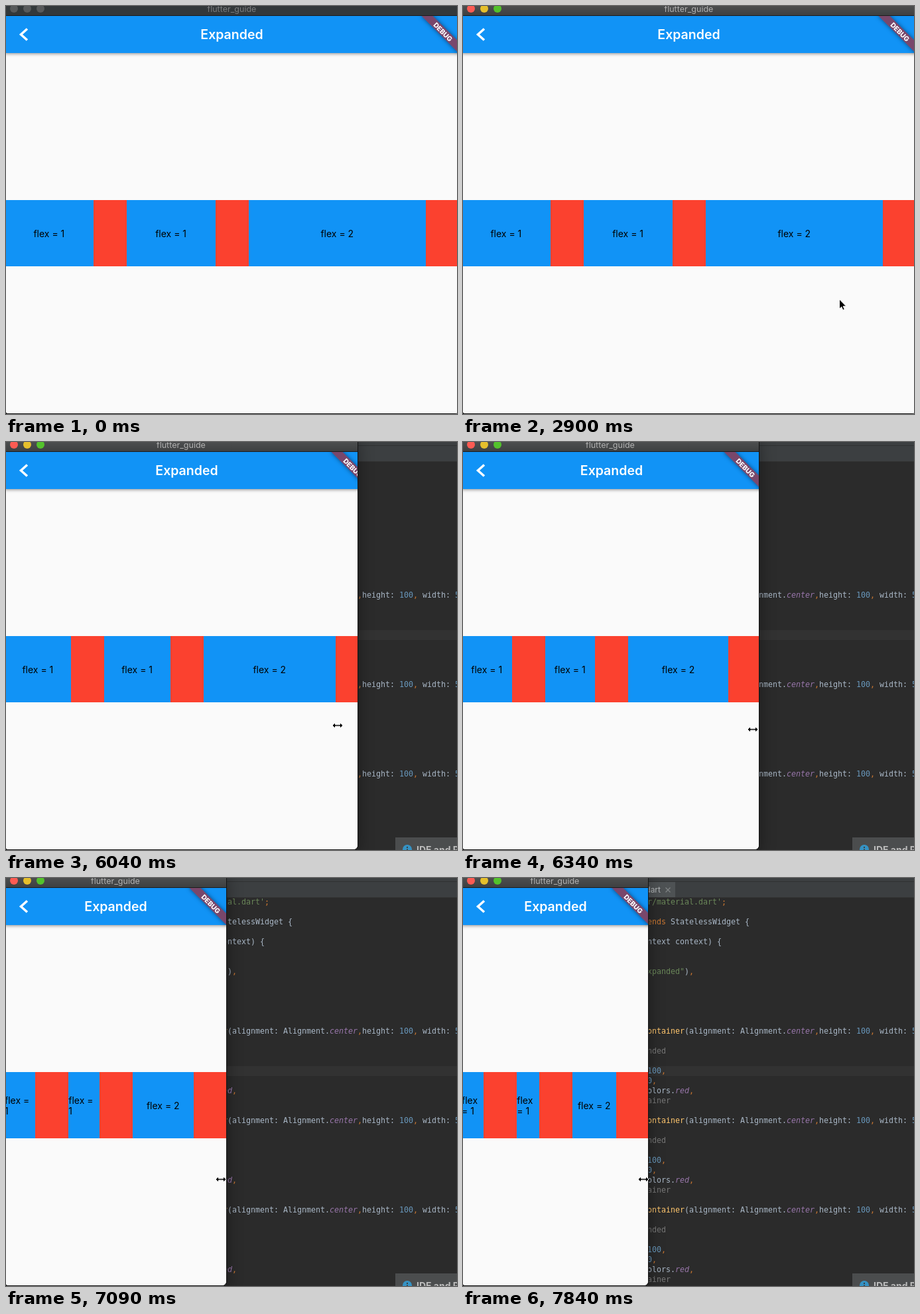
These frames come from a looping animation (680x616 px, 7990 ms). An HTML page:

```html
<!DOCTYPE html>
<html>
<head>
<meta charset="utf-8">
<style>
  html, body { margin: 0; width: 100%; height: 100%; overflow: hidden; background: #2b2b2b; }
  div, svg { position: absolute; }
  #stage { left: 0; top: 0; width: 680px; height: 616px; overflow: hidden; background: #2b2b2b; font-family: Inter, sans-serif; }

  /* editor behind the window */
  #toolbar { width: 680px; height: 30px; background: linear-gradient(#3c3f41 5px, #2f3132 5px 6px, #3c3f41 6px 29px, #323232 29px); }
  #tab { top: 6px; width: 320px; height: 23px; background: #4e5254; color: #b4b8ba; font-size: 12px; line-height: 23px; }
  #tab span { position: absolute; right: 22px; }
  #tab svg { left: 305px; top: 8px; }
  #caret { top: 284px; width: 680px; height: 15px; background: #323232; }
  .line { font: 11.63px/15px "DejaVu Sans Mono", monospace; color: #a9b7c6; white-space: pre; }
  .str { color: #6a8759; } .key { color: #cc7832; } .num { color: #6897bb; }
  .call { color: #ffc66d; } .hint { color: #787878; } .prop { color: #9876aa; font-style: italic; }
  #notice { left: 587px; top: 597px; width: 100px; height: 30px; background: #4b4d4e; color: #bbb; font: 700 14px/38px Inter, sans-serif; white-space: nowrap; text-indent: 32px; }
  #notice svg { left: 11px; top: 11px; }

  /* application window */
  #shadow, #win { left: -2px; top: -10px; height: 625px; border-radius: 0 0 6px 6px; }
  #shadow { box-shadow: 0 0 0 1px #141414, 0 8px 24px rgba(0,0,0,.4); }
  #win { overflow: hidden; background: #fafafa; }
  #title { top: 0; width: 100%; height: 24px; background: linear-gradient(#4c4e4f 10px, #3e4041); border-bottom: 1px solid #1c1c1c; }
  #title p { margin: 10px 0 0; font-size: 12.5px; line-height: 9px; text-align: center; color: #b2b2b2; }
  .light { top: 8px; width: 12px; height: 12px; border-radius: 50%; }
  .idle #title { background: #33383a; }
  .idle #title p { color: #7b7d7e; }
  .idle .light { background: #585a5b !important; }
  #app { top: 25px; height: 600px; overflow: hidden; background: #fafafa; }
  #bar { width: 100%; height: 56px; background: #1193f6; box-shadow: 0 1px 5px rgba(0,0,0,.45); color: #fff; font-weight: 600; font-size: 19.5px; line-height: 56px; text-align: center; }
  #back { left: 0; top: 0; }
  #row { top: 278px; width: 100%; height: 100px; display: flex; }
  #row p { margin: 0; flex: 1 1 0; min-width: 0; background: #1193f6; color: #000; font-size: 14px; line-height: 16px; display: flex; align-items: center; justify-content: center; padding-top: 2px; box-sizing: border-box; }
  #row p.wide { flex-grow: 2; }
  #row b { flex: 0 0 50px; background: #fb412f; }
  #banner { right: -16px; top: 18px; width: 80px; height: 12px; transform: rotate(45deg); background: rgba(183,28,28,.63); box-shadow: 0 0 6px rgba(0,0,0,.5); color: #fff; font: 800 10.2px/12px Inter, sans-serif; text-align: center; }
  #cursors { left: 0; top: 0; }
</style>
</head>
<body>
<div id="stage">
  <div id="caret"></div>
  <div id="code"></div>
  <div id="toolbar"></div>
  <div id="tab"><span>expanded.dart</span><svg width="8" height="8"><path d="M.5.5l7 7m0-7l-7 7" stroke="#7f8385" stroke-width="1.2"/></svg></div>
  <div id="notice">IDE and Plugin Updates<svg width="14" height="14"><circle cx="7" cy="7" r="7" fill="#3592c4"/><path d="M7 3v2m0 1.500v5" stroke="#3c3f41" stroke-width="2"/></svg></div>
  <div id="shadow"></div>
  <div id="win">
    <div id="title">
      <p>flutter_guide</p>
      <div class="light" style="left:8px;background:#fc5b53"></div>
      <div class="light" style="left:28px;background:#e5bf2c"></div>
      <div class="light" style="left:48px;background:#53c22c"></div>
    </div>
    <div id="app">
      <div id="row"><p>flex = 1</p><b></b><p>flex = 1</p><b></b><p class="wide">flex = 2</p><b></b></div>
      <div id="bar">Expanded</div>
      <svg id="back" width="50" height="56"><path d="M34 19.500L24.500 28l9.500 8.500" fill="none" stroke="#fff" stroke-width="3.500"/></svg>
      <div id="banner">DEBUG</div>
    </div>
  </div>
  <svg id="cursors" width="680" height="616" stroke="#fff" stroke-linejoin="round">
    <path id="arrow" d="M1.500.8v14.400l3.200-3 2.200 5 2.400-1-2.100-4.900h4.500z"/>
    <path id="resize" d="M-8 0l4.500-4.300v3.100h7v-3.100L8 0 3.500 4.300V1.200h-7v3.100z"/>
  </svg>
</div>
<script>
const $ = id => document.getElementById(id);

// Editor text, coloured by token
const token = /(\/\/ .*)|('.*'|".*")|(\bclass\b|\bextends\b|[,;])|(\d+)|(Container(?=\())|(\bcenter\b|\bred\b)/g;
const kinds = ['hint', 'str', 'key', 'num', 'call', 'prop'];
function line(x, y, text) {
  const html = text.replace(token, (m, ...groups) =>
    `<span class="${kinds[groups.findIndex(g => g === m)]}">${m}</span>`);
  $('code').insertAdjacentHTML('beforeend',
    `<div class="line" style="left:${x}px;top:${y - 8}px">${html}</div>`);
}
line(173, 37, "'package:flutter/material.dart';");
line(257, 67, 'extends StatelessWidget {');
line(229, 97, 'BuildContext context) {');
line(264, 142, '"Expanded"),');
for (let y = 232; y < 616; y += 135) {
  line(271, y, 'Container(alignment: Alignment.center,height: 100, width: 50),');
  line(229, y + 30, '// Expanded');
  line(222, y + 60, 'height: 100,');
  line(222, y + 75, 'width: 50,');
  line(222, y + 90, 'color: Colors.red,');
  line(229, y + 105, '// Container');
}

const NONE = 0, ARROW = 1, RESIZE = 2, FULL = 683, LOOP = 7990;
const steps = [
  [0, NONE],
  [2900, ARROW, 566, 442],
  [3200, ARROW, 608, 421],
  [3350, ARROW, 664, 405],
  [3500, ARROW, 666, 405],
  [3650, ARROW, 675, 403],
  [3790, NONE],
  [4840, RESIZE, 680, 408],
  [4990, RESIZE, 680, 416],
  [5440, RESIZE, 680, 408],
  [5890, RESIZE, 640, 414, 655, 668],
  [6040, RESIZE, 500, 428, 530, 547],
  [6190, RESIZE, 466, 431, 484, 490],
  [6340, RESIZE, 437, 434, 446, 450],
  [6490, RESIZE, 428, 436, 433, 435],
  [6640, RESIZE, 417, 438, 418, 418],
  [6940, RESIZE, 396, 446, 404, 406],
  [7090, RESIZE, 324, 455, 332, 333],
  [7240, RESIZE, 284, 455, 290, 291],
  [7390, RESIZE, 283, 455, 288, 288],
  [7540, RESIZE, 314, 455, 316, 316],
  [7690, RESIZE, 318, 455, 322, 322],
  [7840, RESIZE, 272, 455, 279, 281]
];

function show(el, on, x, y) {
  el.style.display = on ? '' : 'none';
  if (on) el.setAttribute('transform', `translate(${x} ${y})`);
}
const start = performance.now();
function draw() {
  const t = (performance.now() - start) % LOOP;
  const [, pointer, x, y, right = FULL, content = FULL] = steps.findLast(s => s[0] <= t);
  $('win').className = t < 500 ? 'idle' : '';
  $('win').style.width = $('shadow').style.width = right + 2 + 'px';
  $('app').style.width = content + 2 + 'px';
  show($('arrow'), pointer === ARROW, x, y);
  show($('resize'), pointer === RESIZE, x, y);
  requestAnimationFrame(draw);
}
draw();
</script>
</body>
</html>
```
